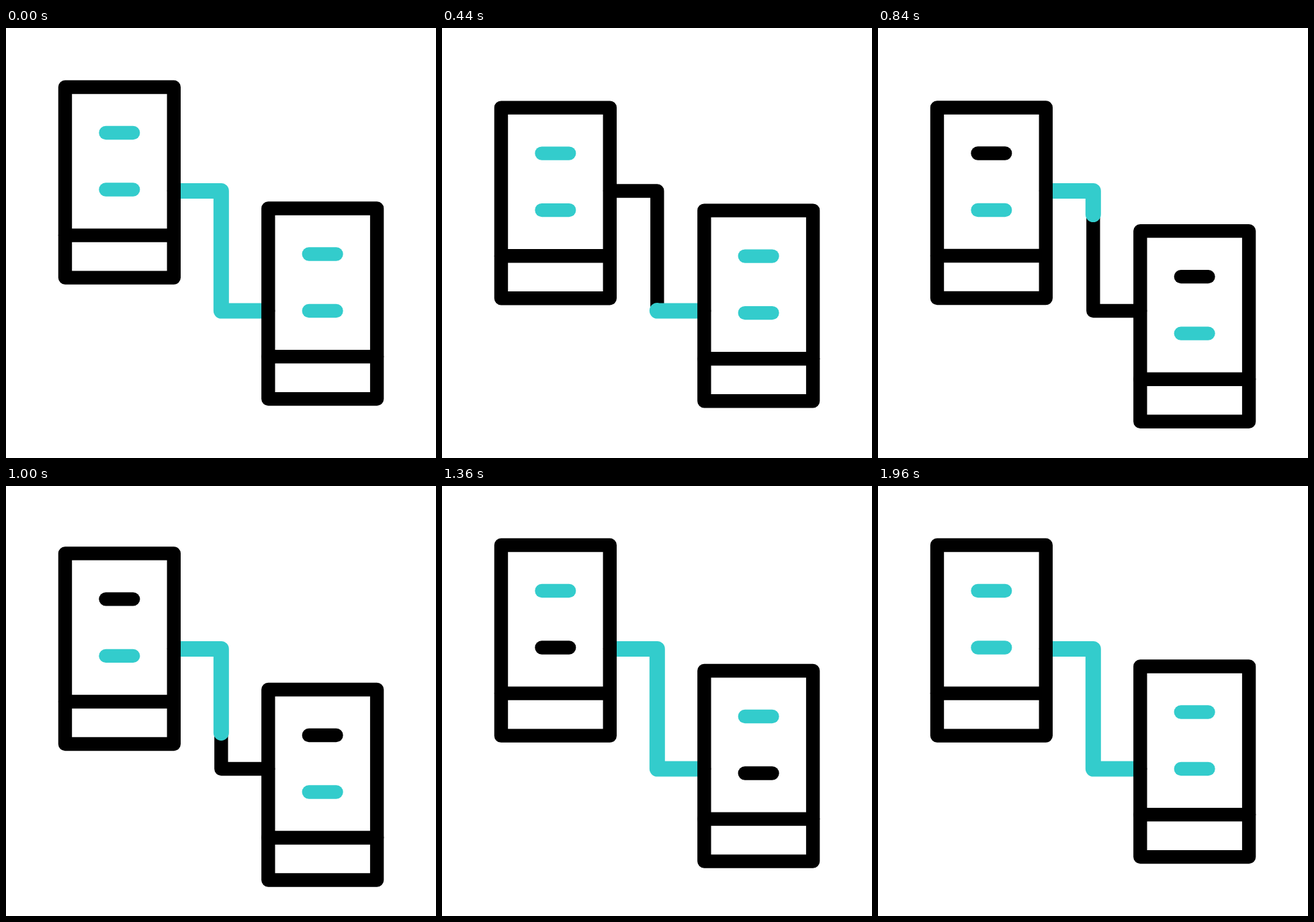
An HTML page that plays this animation: 640 px wide and 640 px high, repeating every 2160 ms.

```html
<!DOCTYPE html>
<html lang="en">
<head>
<meta charset="utf-8">
<title>Linked servers</title>
<style>
  html, body { margin: 0; width: 100%; height: 100%; overflow: hidden; background: #fff; }
  svg { display: block; width: 100%; height: 100%; }
  path { fill: none; stroke: #000; stroke-width: 20.4; stroke-linecap: round; stroke-linejoin: round; }
  .flow { stroke: #3cc; stroke-width: 23; }
</style>
</head>
<body>
<svg viewBox="0 0 640 640">
  <path d="M250 242.5H320.3V421H390.2"/>
  <path class="flow" id="flow"/>
  <g id="left"></g>
  <g id="right"></g>
</svg>
<script>
const LOOP = 2160, STEP = 40, LAG = 280, LEG = 700, DROP = 34.5;
const TEAL = '#3cc', BLACK = '#000';
const wire = [[252, 242.5], [320.3, 242.5], [320.3, 421], [388, 421]];
const flow = document.getElementById('flow');

const clamp = x => Math.min(1, Math.max(0, x));

// Cubic ease with handles (x1, 0) and (x2, 1), solved by bisection.
function ease(x, x1, x2) {
  if (x <= 0 || x >= 1) return clamp(x);
  let lo = 0, hi = 1;
  for (let i = 0; i < 30; i++) {
    const s = (lo + hi) / 2, r = 1 - s;
    if (3 * r * r * s * x1 + 3 * r * s * s * x2 + s * s * s < x) lo = s; else hi = s;
  }
  return lo * lo * (3 - 2 * lo);
}

function addPath(parent, d) {
  const p = document.createElementNS('http://www.w3.org/2000/svg', 'path');
  p.setAttribute('d', d);
  parent.appendChild(p);
  return p;
}

function makeServer(id, x, y, lag) {
  const g = document.getElementById(id);
  addPath(g, 'M88 88H249.8V371.6H88Z');
  addPath(g, 'M88 308.6H249.8');
  const top = addPath(g, 'M148.5 156H189.2');
  const bottom = addPath(g, 'M148.5 240.5H189.2');
  return t => {
    t -= lag;
    const dy = DROP * (ease(t / LEG, .56, .195) - ease(t / LEG - 1, .42, .22));
    g.setAttribute('transform', `translate(${x} ${y + dy})`);
    top.style.stroke = t >= 480 && t < 1080 ? BLACK : TEAL;
    bottom.style.stroke = t >= 1080 && t < 1680 ? BLACK : TEAL;
  };
}

// The part of the wire between two fractions of its length.
function section(from, to) {
  const size = (a, b) => Math.abs(b[0] - a[0]) + Math.abs(b[1] - a[1]);
  const total = wire.slice(1).reduce((sum, p, i) => sum + size(wire[i], p), 0);
  const points = [];
  let done = 0;
  for (let i = 1; i < wire.length; i++) {
    const a = wire[i - 1], b = wire[i], len = size(a, b);
    const u = clamp((from * total - done) / len), v = clamp((to * total - done) / len);
    if (v > u) {
      for (const k of [u, v]) points.push([a[0] + (b[0] - a[0]) * k, a[1] + (b[1] - a[1]) * k]);
    }
    done += len;
  }
  return points.length ? 'M' + points.map(p => p.join(' ')).join('L') : '';
}

const servers = [makeServer('left', 0, 0, 0), makeServer('right', 302.3, 180.5, LAG)];

function draw(t) {
  servers.forEach(update => update(t));
  flow.setAttribute('d', t < 600 ? section(clamp(t / 562), 1) : section(0, clamp((t - 656) / 560)));
}

const start = performance.now();
function tick() {
  const t = (performance.now() - start) % LOOP;
  draw(Math.floor(t / STEP) * STEP);
  requestAnimationFrame(tick);
}
tick();
</script>
</body>
</html>
```
